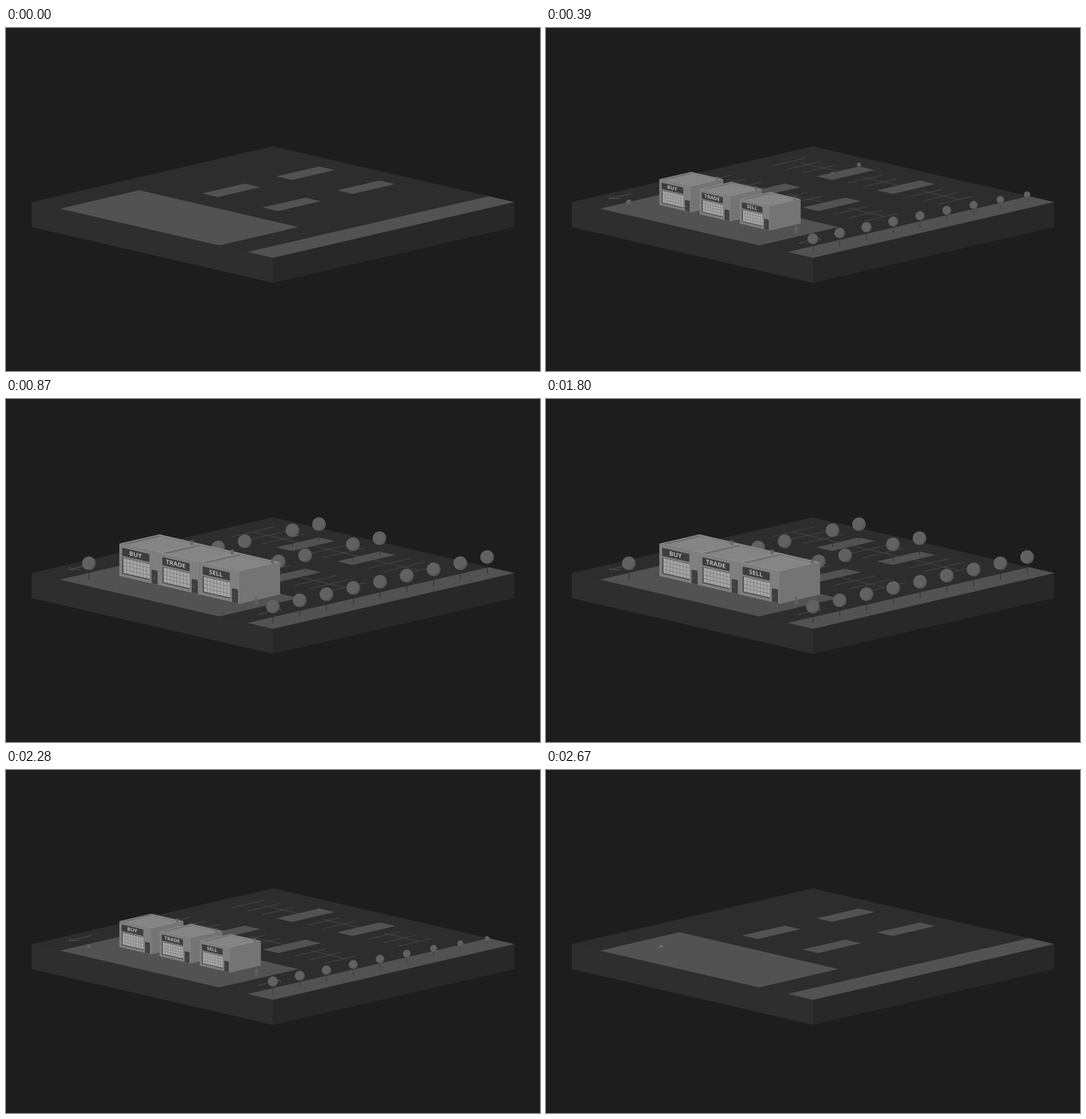
Write an HTML page with a canvas that moves like this. It is 933 px wide and 600 px high and loops after 2700 ms.

```html
<!DOCTYPE html>
<html lang="en">
<head>
<meta charset="utf-8">
<title>Shops</title>
<style>
  html, body { margin: 0; height: 100%; overflow: hidden; background: #1d1d1d; }
  canvas { display: block; }
</style>
</head>
<body>
<canvas id="stage" width="933" height="600"></canvas>
<script>
const c = document.getElementById('stage').getContext('2d');
const LOOP = 2700;
const HALF_W = 421.5, HALF_H = 97.5, SLOPE = HALF_H / HALF_W;
const SLOT = 0.0627;      // parking slot width
const FIRST = 0.089;      // first parking line
const ROW = 0.308;        // distance between parking rows
const SHOP = 1 / 6;       // shop width and depth

// Ground plane: p runs down to the right, q down to the left, both 0 to 1.
const iso = (p, q) => [466.5 + HALF_W * (p - q), 207 + HALF_H * (p + q)];
const clamp = v => Math.max(0, Math.min(1, v));

// Scale of a part that starts to grow at d and is full at e.
const grow = (x, d, e = 1) => 1 - (1 - clamp((x - d) / (e - d))) ** 3;

function trace(pts) {
  c.beginPath();
  pts.forEach(pt => c.lineTo(...pt));
  c.closePath();
}

function poly(color, ...pts) {
  c.fillStyle = color;
  trace(pts);
  c.fill();
}

function tile(color, p, q, dp, dq) {
  poly(color, iso(p, q), iso(p + dp, q), iso(p + dp, q + dq), iso(p, q + dq));
}

function rect(color, x, y, w, h) {
  c.fillStyle = color;
  c.fillRect(x, y, w, h);
}

function disc(color, x, y, rx, ry = rx) {
  c.fillStyle = color;
  c.beginPath();
  c.ellipse(x, y, rx, ry, 0, 0, 7);
  c.fill();
}

function line(from, to) {
  c.beginPath();
  c.moveTo(...from);
  c.lineTo(...to);
  c.stroke();
}

// Draws a part around its ground point at scale s.
function at(p, q, s, draw) {
  if (s <= 0) return;
  c.save();
  c.translate(...iso(p, q));
  c.scale(s, s);
  draw();
  c.restore();
}

function ground() {
  const [left, front, right] = [iso(0, 1), iso(1, 1), iso(1, 0)];
  const down = ([x, y]) => [x, y + 43.7];
  rect('#1d1d1d', 0, 0, 933, 600);
  poly('#2e2e2e', left, iso(0.5, 0.5), front, down(front), down(left));
  poly('#282828', front, iso(0.5, 0.5), right, down(right), down(front));
  tile('#2d2d2d', 0, 0, 1, 1);
  tile('#525252', 0.117, 0.671, 0.66, 0.329);
  tile('#525252', 0.895, 0, 0.105, 1);
}

function parking(s) {
  for (const q of [0.085, 0.085 + ROW]) {
    c.strokeStyle = '#4a4a4a';
    c.lineWidth = 1;
    for (let k = 0; k < 12 && s > 0; k++) {
      const p = FIRST + k * SLOT;
      if (![3, 4, 7, 8].includes(k)) line(iso(p, q + 0.174), iso(p, q + 0.174 * (1 - s)));
      if (k % 4 == 3) line(iso(p, q + 0.088), iso(p - 0.187 * s, q + 0.088));
    }
    for (const k of [3, 7]) tile('#525252', FIRST + k * SLOT - 0.001, q, SLOT + 0.002, 0.177);
  }
}

function arrow(p, q, dir, s) {
  at(p, q, s, () => {
    c.strokeStyle = '#4c4c4c';
    c.lineWidth = 1.2;
    const tip = [0, 0];
    line(tip, [dir * 39, -dir * 39 * SLOPE]);
    line(tip, [dir * 19, 0]);
    line(tip, [0, -dir * 4.4]);
  });
}

function tree(p, q, s) {
  at(p, q, s, () => {
    rect('#303030', -0.6, -20, 1.2, 20);
    c.beginPath();
    c.arc(0, -29, 12, 0, 7);
    c.clip();
    disc('#565656', 0, -29, 12);
    disc('#616161', -3, -31.5, 12.4);
  });
}

function hydrant(s) {
  at(0.745, 0.814, s, () => {
    rect('#666', -3.5, -2, 7, 2);
    rect('#626262', -2.3, -11, 4.6, 10);
    rect('#6a6a6a', -3.8, -9, 7.6, 2.6);
    disc('#696969', 0, -11.3, 2.6, 3);
    disc('#444', 0, -7.4, 1.2);
  });
}

// Point of a shop: a along the front, b to the back, h up.
const P = (a, b, h) => [(a + b) * SHOP * HALF_W, (a - b) * SHOP * HALF_H - h];
const flat = (h, m = 0) => [P(m, m, h), P(1 - m, m, h), P(1 - m, 1 - m, h), P(m, 1 - m, h)];

function shop(i, s) {
  at(0.207 + i * SHOP, 0.844, s, () => {
    const H = 56.5, D = 53, m = 0.04;
    const base = flat(0), top = flat(H), rim = flat(H, m), floor = flat(D, m);
    poly('#7f7f7f', base[0], base[1], top[1], top[0]);
    poly('#747474', base[1], base[2], top[2], top[1]);
    poly('#8f8f8f', ...top);

    // Sunken roof
    c.save();
    trace(rim);
    c.clip();
    poly('#6e6e6e', rim[0], rim[3], floor[3], floor[0]);
    poly('#7d7d7d', rim[3], rim[2], floor[2], floor[3]);
    poly('#858585', ...floor);
    c.restore();

    // Roof pipe
    rect('#686868', 124.3, -61.5, 5.2, 6.5);
    disc('#686868', 126.9, -55, 2.6, 1.2);
    disc('#575757', 126.9, -61.5, 2.6, 1.2);

    // Front
    c.transform(1, SLOPE, 0, 1, 0, 0);
    rect('#3d3d3d', 5, -50.3, 47.5, 14);
    c.fillStyle = '#b8b8b8';
    c.font = 'bold 10.7px "Open Sans", "Noto Sans", sans-serif';
    c.textAlign = 'center';
    c.fillText(['BUY', 'TRADE', 'SELL'][i], 28.3, -40);

    rect('#4b4b4b', 5, -33.5, 48, 28.5);
    rect('#a6a6a6', 7.2, -32.7, 45.8, 25.7);
    for (let k = 1; k < 8; k++) rect('#7b7b7b', 6.8 + k * 5.75, -32.7, 0.9, 25.7);
    for (let k = 1; k < 4; k++) rect('#7b7b7b', 7.2, -33.1 + k * 6.4, 45.8, 0.9);

    rect('#3f3f3f', 56.3, -24.3, 10.7, 24);
    disc('#999', 60.3, -10.7, 0.8);
  });
}

// Trees in the order in which they grow: front strip, side, islands
const trees = [];
for (let i = 0; i < 9; i++) trees.push([0.949, 0.949 - 0.111 * i]);
trees.push([0.18, 0.943]);
for (let i = 0; i < 8; i++) {
  const island = i >> 1;
  trees.push([0.306 + 4 * SLOT * (island >> 1), 0.115 + 0.11 * (i % 2) + ROW * (island % 2)]);
}

function draw(t) {
  const out = (2684 - t) / 979, opening = t < LOOP / 2;
  const xs = clamp(opening ? t / 951 : out);
  const xt = clamp(opening ? t / 865 : out);
  const plant = i => {
    const late = Math.max(0, i - 6);
    tree(...trees[i], grow(xt, 0.058 + 0.0325 * i, 1 - 0.0014 * late * late));
  };

  ground();
  parking(grow(xt, 0.04));
  arrow(0.047, 0.891, 1, grow(xt, 0.04, 0.42));
  arrow(0.84, 0.809, -1, grow(xt, 0.04, 0.42));
  for (let i = 10; i < 18; i++) plant(i);
  for (let i = 0; i < 3; i++) shop(i, grow(xs, 0.027 * i));
  hydrant(grow(xt, 0.06));
  for (let i = 9; i >= 0; i--) plant(i);
}

let start;
function tick(now) {
  start ??= now;
  draw((now - start) % LOOP);
  requestAnimationFrame(tick);
}
requestAnimationFrame(tick);
</script>
</body>
</html>
```
